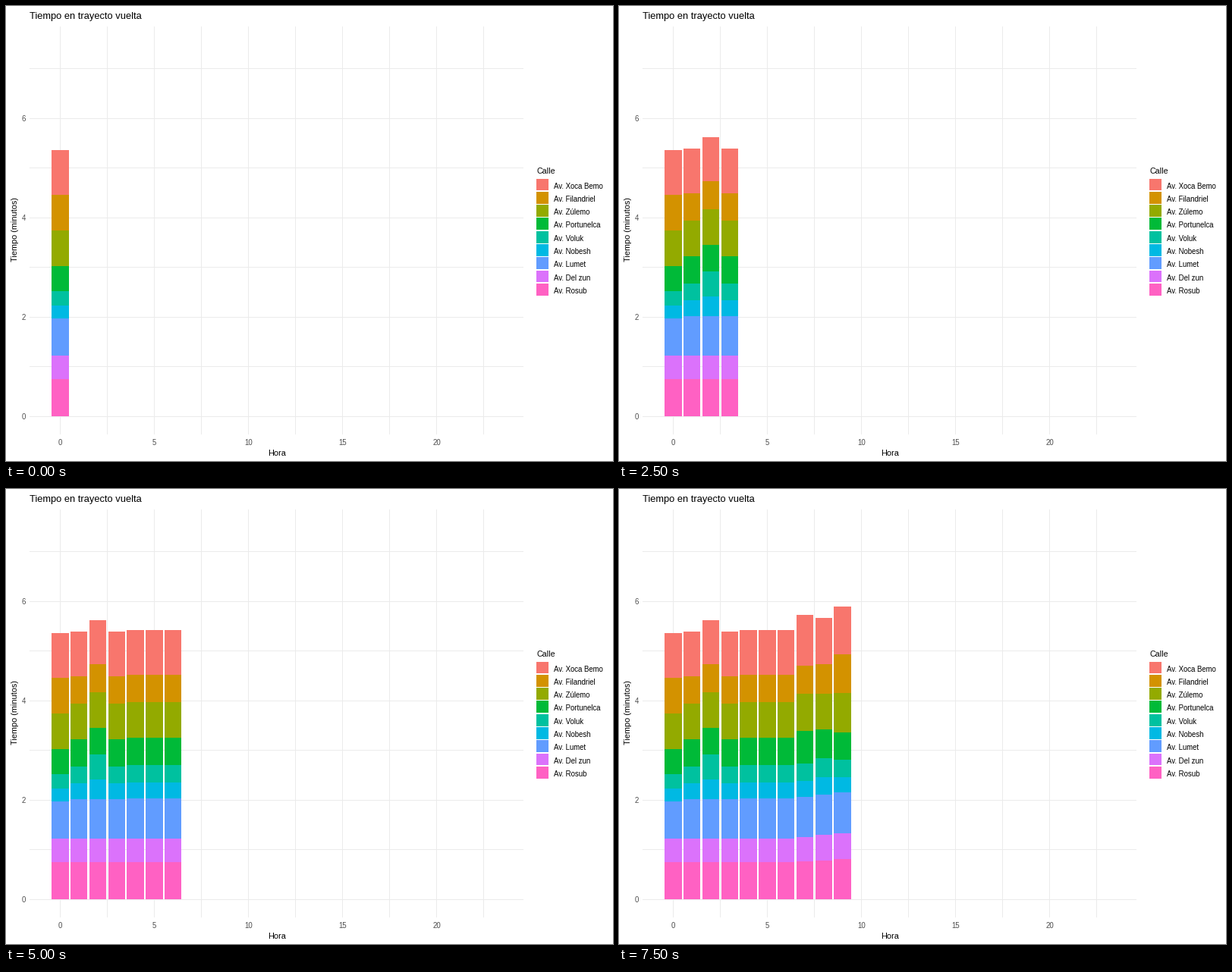
Write a matplotlib script that moves like this. It is 800 by 600 pixels and loops after 8 s.

```python
import matplotlib.pyplot as plt
from matplotlib.animation import FuncAnimation
from matplotlib.patches import Rectangle

plt.rcParams["font.family"] = "Liberation Sans"

W, H, DPI = 800, 600, 100
LOOP, TICK = 8000, 20        # ms
STEP = 2500 / 3              # ms between two bars
HOURS = 10
X0, HOUR = 71.36, 24.8       # pixel of hour 0, pixels per hour
Y0, MINUTE = 541.3, 65.5     # pixel of minute 0, pixels per minute
LEFT, RIGHT, TOP, BOTTOM = 31, 682, 27, 565
GRID, GREY = "#EBEBEB", "#4D4D4D"

# Name, colour and usual minutes of each street, from the top of the stack
STREETS = [
    ("Av. Xoca Bemo", "#F8766D", 0.90),
    ("Av. Filandriel", "#D39200", 0.55),
    ("Av. Zúlemo", "#93AA00", 0.72),
    ("Av. Portunelca", "#00BA38", 0.55),
    ("Av. Voluk", "#00C19F", 0.35),
    ("Av. Nobesh", "#00B9E3", 0.32),
    ("Av. Lumet", "#619CFF", 0.81),
    ("Av. Del zun", "#DB72FB", 0.47),
    ("Av. Rosub", "#FF61C3", 0.75),
]
CENTRAL = range(3, 7)        # streets that speed up at night

# Passing delays: hour, streets, minutes
DELAYS = [
    (0, CENTRAL, -0.05), (0, [1], 0.17),
    (2, [4], 0.16), (2, [5], 0.08),
    (7, [0], 0.10), (7, [3], 0.11),
    (8, [3, 4, 5], 0.03), (8, [2], -0.04),
    (9, [1], 0.18),
]

fig = plt.figure(figsize=(W / DPI, H / DPI), dpi=DPI, facecolor="white")
ax = fig.add_axes([0, 0, 1, 1])
ax.set_xlim(0, W)
ax.set_ylim(H, 0)
ax.axis("off")


def box(x0, y0, x1, y1, color, z=1):
    return ax.add_patch(Rectangle((x0, y0), x1 - x0, y1 - y0,
                                  facecolor=color, linewidth=0, zorder=z))


def label(x, y, text, px, color="black", ha="left", angle=0):
    ax.text(x, y, text, fontsize=px * 72 / DPI, color=color, ha=ha,
            va="baseline", rotation=angle, rotation_mode="anchor")


def draw_axes():
    for i in range(10):
        hour = 2.5 * i
        x = int(X0 + HOUR * hour)
        box(x, TOP, x + 1, BOTTOM, GRID)
        if i % 2 == 0:
            label(x + 0.5, 579, f"{hour:.0f}", 9.6, GREY, "center")
    for minute in range(8):
        y = int(Y0 - MINUTE * minute)
        box(LEFT, y, RIGHT, y + 1, GRID)
        if minute % 2 == 0:
            label(26, y + 4, str(minute), 9.6, GREY, "right")
    label(LEFT, 17, "Tiempo en trayecto vuelta", 12.85)
    label(357, 593, "Hora", 11, ha="center")
    label(15, 295, "Tiempo (minutos)", 10.9, ha="center", angle=90)


def draw_legend():
    label(699, 221, "Calle", 10.6)
    for i, (name, color, _) in enumerate(STREETS):
        y = 228.1 + 17.28 * i
        box(699, int(y), 715, int(y + 15.85), color)
        label(722, int(y) + 13, name, 9.6)


def minutes(hour, street):
    total = STREETS[street][2]
    if street not in CENTRAL:
        total += 0.02 * max(0, hour - 6)     # morning rush
    elif hour < 4:
        total -= 0.0075
    return total + sum(extra for h, group, extra in DELAYS
                       if h == hour and street in group)


def draw_stack(hour):
    centre = X0 + HOUR * hour
    x0, x1 = round(centre - 0.45 * HOUR), round(centre + 0.45 * HOUR)
    parts, base = [], Y0
    for street in reversed(range(len(STREETS))):
        top = base - MINUTE * minutes(hour, street)
        parts.append(box(x0, round(top), x1, round(base),
                         STREETS[street][1], 2))
        base = top
    return parts


draw_axes()
draw_legend()
stacks = [draw_stack(hour) for hour in range(HOURS)]


def update(frame):
    last = int((frame * TICK + 15) / STEP)
    for hour, stack in enumerate(stacks):
        for part in stack:
            part.set_visible(hour <= last)
    return []


def init():
    return update(0)


anim = FuncAnimation(fig, update, frames=LOOP // TICK, init_func=init,
                     interval=TICK, repeat=True, repeat_delay=0, blit=False)
plt.show()
```
